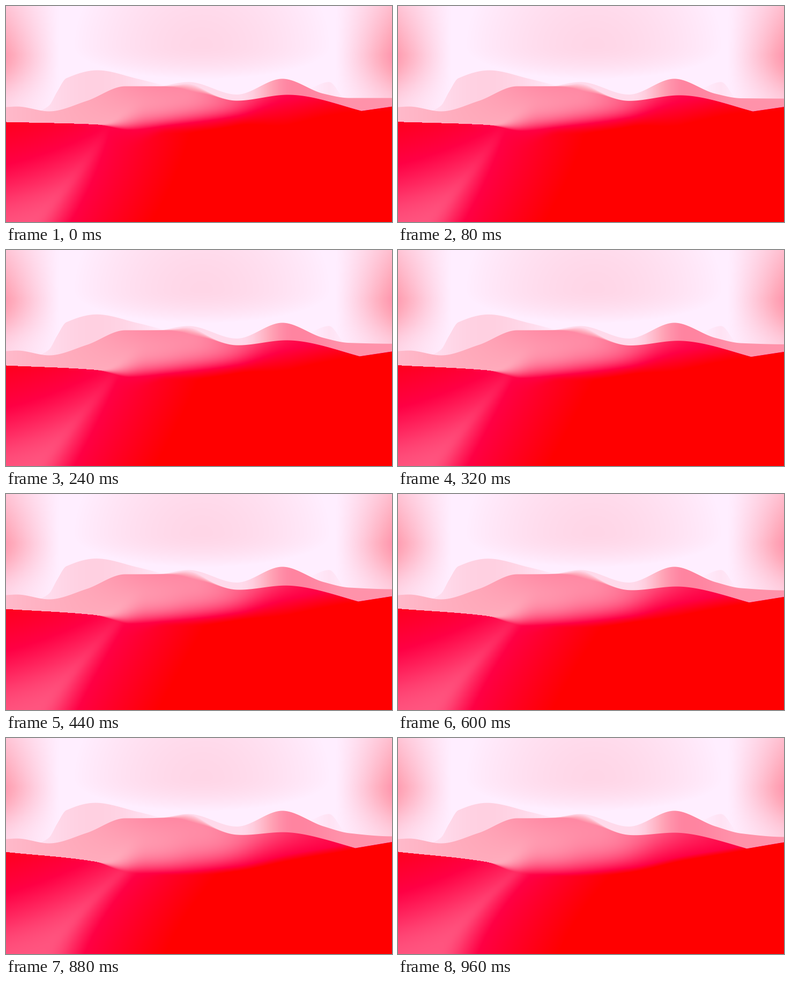
These frames come from a looping animation (720x405 px, 1000 ms). An HTML page with a canvas:

```html
<!DOCTYPE html>
<html lang="en">
<head>
<meta charset="utf-8">
<title>Red dunes</title>
<style>
html, body { margin: 0; width: 100%; height: 100%; overflow: hidden; background: #fef; }
canvas { display: block; width: 100%; height: 100%; }
</style>
</head>
<body>
<canvas id="stage" width="720" height="405"></canvas>
<script>
const W = 720, H = 405, LOOP = 1000, STEP = 40;
const ctx = document.getElementById('stage').getContext('2d');
const img = ctx.createImageData(W, H);
img.data.fill(255);

const clamp = (v, a = 0, b = 1) => v < a ? a : v > b ? b : v;
const mix = (a, b, t) => a + (b - a) * t;
const smooth = u => (u = clamp(u)) * u * (3 - 2 * u);
const bump = (x, centre, width) => Math.exp(-(((x - centre) / width) ** 2));
const smoothMin = (a, b, k) => {
  const h = Math.max(0, 1 - Math.abs(a - b) / k);
  return Math.min(a, b) - h * h * k / 4;
};
const smoothMax = (a, b, k) => -smoothMin(-a, -b, k);

// Smooth curve through a few [x, y] points, without overshoot; H outside them.
function curve(points) {
  const last = points.length - 1;
  const slope = i => (points[i + 1][1] - points[i][1]) / (points[i + 1][0] - points[i][0]);
  const tangent = points.map((_, i) => {
    const a = slope(Math.max(0, i - 1)), b = slope(Math.min(last - 1, i));
    return a * b > 0 ? 2 * a * b / (a + b) : 0;
  });
  return x => {
    if (x < points[0][0] || x > points[last][0]) return H;
    let i = 0;
    while (i < last - 1 && x >= points[i + 1][0]) i++;
    const [x0, y0] = points[i], [x1, y1] = points[i + 1];
    const w = x1 - x0, u = (x - x0) / w, r = 1 - u;
    return r * r * ((1 + 2 * u) * y0 + u * w * tangent[i])
         + u * u * ((3 - 2 * u) * y1 - r * w * tangent[i + 1]);
  };
}

// Haze runs from -68 (pure red) through 0 (crimson) to 238 (near white).
const farRidge = curve([[66, 195], [80, 186], [95, 160], [112, 135], [170, 120], [245, 136], [300, 150]]);
const smallRidge = curve([[565, 155], [602, 142], [628, 172]]);
const midRidge = curve([[290, 150], [340, 142], [430, 165.5], [515, 136], [592, 164], [640, 172], [720, 172]]);
const frontRidge = curve([[0, 189], [20, 188], [80, 197], [150, 177.5], [222, 150], [325, 150],
  [430, 177], [525, 166], [665, 197], [720, 215]]);
// Line where the front haze has thinned to crimson, at both ends of the loop.
const crimsonStart = curve([[0, 217], [165, 221.5], [230, 232], [300, 224], [430, 206], [525, 175], [665, 150], [720, 150]]);
const crimsonEnd = curve([[0, 213], [165, 232], [230, 256], [300, 255], [430, 243], [525, 222], [665, 197], [720, 178]]);

const hills = [
  { ridge: (x, t) => farRidge(x) + 2 * t * smooth((x - 130) / 70),
    haze: x => 208 + 30 * ((x - 165) / 135) ** 2 },
  { ridge: x => smallRidge(x), haze: x => 226 + .3 * Math.abs(x - 602) },
  { ridge: (x, t) => midRidge(x) + 13 * t * smooth((x - 560) / 160),
    haze: x => 218 - 86 * smooth((x - 435) / 100) + 14 * smooth((x - 550) / 90) },
];

function skyAt(x, y) {
  const dx = (x - 365) / 240, dy = y > 75 ? (y - 75) / 62 : (75 - y) / 200;
  const centre = 24 * Math.max(0, 1 - Math.hypot(dx, dy) ** 1.6);
  const fall = y < 90 ? .42 * (90 - y) : 55 * smooth((y - 90) / 100);
  const side = (dist, width, amp) => (amp - fall) * Math.max(0, 1 - dist / width) ** 1.2;
  return 238 - centre - side(x, 100, 80) - side(W - x, 106, 88);
}
const sky = Float32Array.from({ length: W * H }, (_, i) => skyAt(i % W, Math.floor(i / W)));

// Lighter patch of haze in the lower left corner.
function glow(x, y, t) {
  const d = y - mix(297 - .25 * x - .0007 * x * x, 290 - .3 * x - .0006 * x * x, t);
  const s = H - y;
  const e = mix(120, 148, t) + mix(.6, .4, t) * s + mix(-.001, .0018, t) * s * s - x;
  return smoothMin(smoothMin(d * (d > 0 ? .85 : .5), e * (e > 0 ? 1.5 : .45), 20), 85, 30);
}

// Everything about the front dune that depends on the column alone.
function frontColumn(x, t) {
  const ridge = frontRidge(x) + t * (14 * smooth((x - 330) / 270) - 3 * bump(x, 335, 45));
  const rightSlope = mix(188, 195, t) + (W - x) * mix(.145, .17, t);
  const crimson = mix(crimsonStart(x), crimsonEnd(x), t);
  const start = mix(crimson, ridge, smooth((x - 165) / 100));
  const gap = mix(18, 9, t) + 80 * (1 - smooth((x - 190) / 110)) + 30 * (1 - t) * smooth((x - 430) / 100);
  return {
    crimson, start,
    top: Math.min(ridge, rightSlope),
    soft: 1 + 13 * bump(x, 347, 29),
    fade: Math.max(1, crimson - start),
    sink: Math.max(1, gap * smooth((x - 120) / 60)),
    power: mix(4, 1.3, smooth((x - 280) / 220)),
    haze: (185 - .12 * x) * (1 - smooth((x - 330 - 35 * t) / (220 + 75 * t))),
    lift: .4 * bump(x, 270, 100),
  };
}

function frontAt(c, x, y, t) {
  const haze = c.haze + c.lift * (y - 185);
  const v = y < c.crimson
    ? haze * (1 - clamp((y - c.start) / c.fade) ** c.power)
    : -68 * (y - c.crimson) / c.sink;
  return Math.max(-68, smoothMax(v, glow(x, y, t), 16));
}

function draw(t) {
  for (let x = 0; x < W; x++) {
    const back = hills.map(h => [h.ridge(x, t), h.haze(x)]);
    const front = frontColumn(x, t);
    for (let y = 0; y < H; y++) {
      const i = y * W + x;
      const cover = clamp((y - front.top) / front.soft + .5);
      let v = sky[i];
      if (cover < 1) for (const [edge, haze] of back) v = mix(v, haze, clamp(y - edge + .5));
      if (cover > 0) v = mix(v, frontAt(front, x, y, t), cover);
      img.data[i * 4 + 1] = Math.max(0, v);
      img.data[i * 4 + 2] = v < 0 ? 68 + v : v < 170 ? 68 + .7 * v : v + 17;
    }
  }
  ctx.putImageData(img, 0, 0);
}

const began = performance.now();
let shown = -1;
function tick() {
  const step = Math.floor((performance.now() - began) % LOOP / STEP);
  if (step !== shown) draw((shown = step) * STEP / (LOOP - STEP));
  requestAnimationFrame(tick);
}
tick();
</script>
</body>
</html>
```
